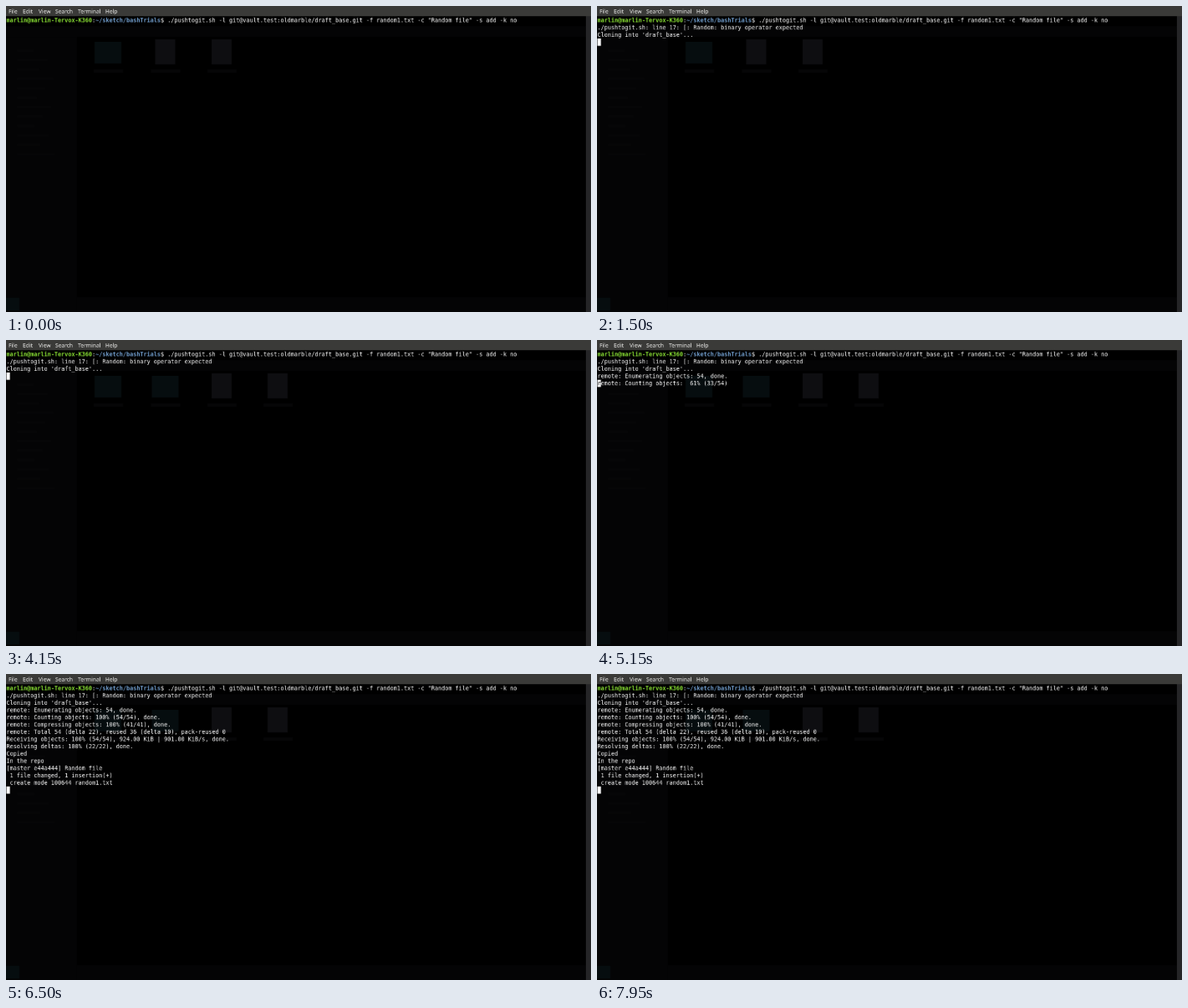
Recreate the animation shown at these times as an HTML page with a canvas. Size 700 by 367 pixels, loop 8000 ms.

```html
<!DOCTYPE html>
<html lang="en">
<head>
<meta charset="utf-8">
<title>Terminal</title>
<style>
  html, body { margin: 0; width: 100%; height: 100%; overflow: hidden; background: #000; }
  canvas { display: block; width: 700px; height: 367px; }
</style>
</head>
<body>
<canvas id="stage" width="700" height="367"></canvas>
<script>
const LOOP = 8000, STEP = 50;
const CELL_W = 8, CELL_H = 17, LEFT = 1, TOP = 25, BASE = 13;
const SCREEN_W = 1366, SCREEN_H = 716;
const MONO = '13.33px "DejaVu Sans Mono", monospace';
const SANS = '13px "Noto Sans", "Open Sans", sans-serif';
const INK = '#ffffff', GREEN = '#8ae234', BLUE = '#729fcf', CURSOR = '#ffffff';
const BAR = '#3a3a38', SCROLLBAR = '#252527';

const stage = document.getElementById('stage').getContext('2d');
stage.imageSmoothingQuality = 'high';

// The desktop is drawn at full size, then scaled down to the stage.
const screen = document.createElement('canvas');
screen.width = SCREEN_W;
screen.height = SCREEN_H;
const g = screen.getContext('2d');

const USER = 'marlin@marlin-Tervox-K360';
const FOLDER = '~/sketch/bashTrials';
const COMMAND = ' ./pushtogit.sh -l git@vault.test:oldmarble/draft_base.git'
  + ' -f random1.txt -c "Random file" -s add -k no';
const PROMPT = [
  [USER, GREEN, true], [':', INK], [FOLDER, BLUE, true], ['$' + COMMAND, INK]
];
const PROMPT_LEN = PROMPT.reduce((n, part) => n + part[0].length, 0);

const MENU = [['File', 6], ['Edit', 39], ['View', 76], ['Search', 115], ['Terminal', 168], ['Help', 232]];

// Moments of the session, in ms
const ENTER = 1500, NEW_FOLDER = 1900, REPLY = 4900, COUNT = 5100, PACK = 5250,
  FETCH = 5800, RATE = 6100, TOTAL = 6250, RESOLVE = 6300, COPIED = 6350, COMMIT = 6450;

function box(x, y, w, h, color) {
  g.fillStyle = color;
  g.fillRect(x, y, w, h);
}

// Same, measured in stage pixels
function shade(x, y, w, h, color) {
  const k = SCREEN_W / 700;
  box(x * k, y * k, w * k, h * k, color);
}

function write(text, col, row, color, bold) {
  g.font = (bold ? 'bold ' : '') + MONO;
  g.fillStyle = color;
  for (let i = 0; i < text.length; i++) {
    if (text[i] !== ' ') {
      g.fillText(text[i], LEFT + (col + i) * CELL_W, TOP + row * CELL_H + BASE);
    }
  }
}

function progress(label, total, start, span, t) {
  const part = Math.min(1, Math.max(0, (t - start) / span));
  const n = Math.max(1, Math.round(total * part));
  const pct = String(Math.floor(100 * n / total)).padStart(3);
  return `${label} objects: ${pct}% (${n}/${total})` + (part === 1 && label !== 'Receiving' ? ', done.' : '');
}

function output(t) {
  const lines = [];
  if (t >= ENTER) {
    lines.push('./pushtogit.sh: line 17: [: Random: binary operator expected',
      "Cloning into 'draft_base'...");
  }
  if (t >= REPLY) lines.push('remote: Enumerating objects: 54, done.');
  if (t >= COUNT) lines.push('remote: ' + progress('Counting', 54, COUNT, 82, t));
  if (t >= PACK) lines.push('remote: ' + progress('Compressing', 41, PACK, 200, t));
  if (t >= TOTAL) lines.push('remote: Total 54 (delta 22), reused 36 (delta 10), pack-reused 0');
  if (t >= FETCH) {
    const rate = t >= TOTAL ? ', 924.00 KiB | 901.00 KiB/s, done.'
      : t >= RATE ? ', 156.00 KiB | 280.00 KiB/s' : '';
    lines.push(progress('Receiving', 54, FETCH, 440, t) + rate);
  }
  if (t >= RESOLVE) lines.push('Resolving deltas: 100% (22/22), done.');
  if (t >= COPIED) lines.push('Copied', 'In the repo');
  if (t >= COMMIT) {
    lines.push('[master e44a444] Random file', ' 1 file changed, 1 insertion(+)',
      ' create mode 100644 random1.txt');
  }
  return lines;
}

// A line still being rewritten keeps the cursor at its start.
function cursorRow(t, count) {
  const busy = (t >= COUNT && t < COUNT + 82) || (t >= PACK && t < PACK + 200)
    || (t >= FETCH && t < TOTAL);
  return busy ? count : count + 1;
}

// File manager showing faintly through the window
function backdrop(t) {
  const dim = '#040405', folder = '#060d0f', file = '#0e0e11', label = '#060607';
  box(0, 0, SCREEN_W, SCREEN_H, '#000');
  shade(0, 24, 694, 13, dim);
  shade(0, 37, 85, 330, dim);
  shade(85, 349, 609, 18, dim);
  shade(0, 350, 16, 15, folder);
  for (let i = 0; i < 12; i++) shade(13, 52 + i * 11.3, 20 + (i * 17) % 27, 3, label);

  const cloned = t >= NEW_FOLDER;
  const item = (x, isFolder) => {
    if (isFolder) shade(x - 16, 43, 32, 26, folder);
    else shade(x - 12, 40, 24, 30, file);
    shade(x - 17, 76, 35, 4, label);
  };
  item(122, true);
  item(190.5, cloned);
  item(258, false);
  if (cloned) item(325, false);
}

function chrome() {
  box(0, 0, SCREEN_W, 24, BAR);
  box(1354, 24, 12, SCREEN_H - 24, SCROLLBAR);
  g.font = SANS;
  g.fillStyle = '#f0f0ee';
  for (const [word, x] of MENU) g.fillText(word, x, 17);
}

function draw(t) {
  backdrop(t);
  chrome();

  let col = 0;
  for (const [text, color, bold] of PROMPT) {
    write(text, col, 0, color, bold);
    col += text.length;
  }
  const lines = output(t);
  lines.forEach((line, i) => write(line, 0, i + 1, INK));

  if ((t + 900) % 1200 < 600) {
    const typed = t < ENTER;
    const c = typed ? PROMPT_LEN : 0;
    const row = typed ? 0 : cursorRow(t, lines.length);
    box(LEFT + c * CELL_W, TOP + row * CELL_H, CELL_W, CELL_H, CURSOR);
    if (!typed && row <= lines.length) write(lines[row - 1][0], 0, row, '#000');
  }
  stage.drawImage(screen, 0, 0, 700, 367);
}

const begin = performance.now();
function tick() {
  const t = (performance.now() - begin) % LOOP;
  draw(Math.floor(t / STEP) * STEP);
  requestAnimationFrame(tick);
}
tick();
</script>
</body>
</html>
```
